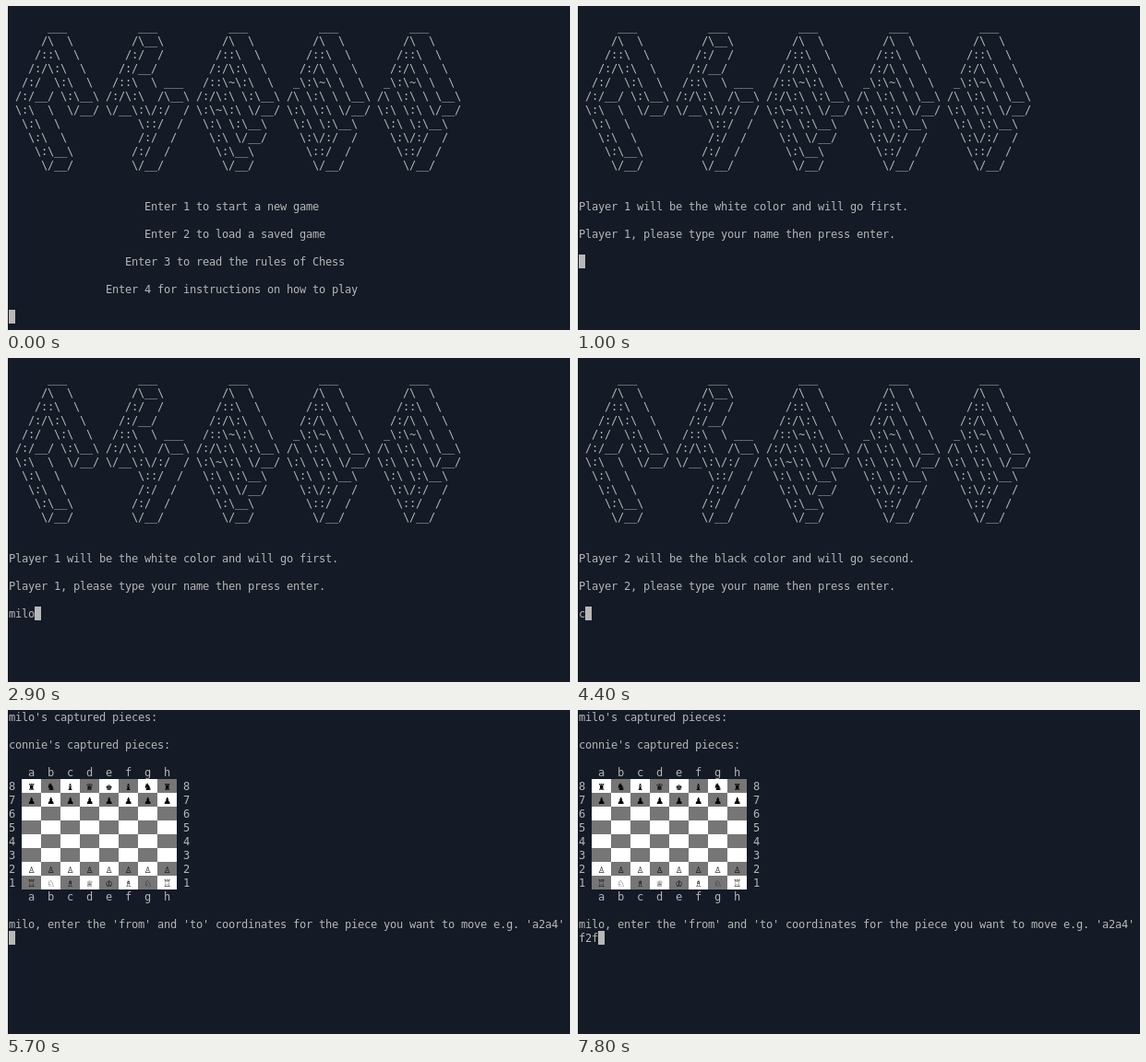
Recreate the animation shown at these times as an HTML page. Size 611x352 px, loop 8 s.

```html
<!DOCTYPE html>
<html lang="en">
<head>
<meta charset="utf-8">
<title>Terminal chess</title>
<style>
  html, body { margin: 0; width: 100%; height: 100%; overflow: hidden; }
  body {
    position: relative;
    background: #141a26;
    color: #b6b6b6;
    font: 12px/15px "DejaVu Sans Mono", monospace;
    letter-spacing: calc(7px - 1ch); /* 7px terminal cells */
  }
  .edge { position: absolute; left: 0; top: 0; width: 2px; height: 100%; background: #eee; }
  section { position: absolute; inset: 0; visibility: hidden; animation: 8s step-end infinite; }
  pre, p { position: absolute; left: 3px; top: calc(var(--row) * 15px); margin: 0; font: inherit; white-space: pre; }
  pre { padding-top: 1px; }

  /* typed text; the right border is the block cursor */
  .typed {
    box-sizing: content-box;
    width: 0;
    height: 14px;
    padding-top: 1px;
    overflow: hidden;
    border-right: 7px solid #b8b8b8;
    animation: 8s step-end infinite;
  }

  .board {
    position: absolute; left: 17px; top: 75px; width: 168px; height: 120px;
    background: conic-gradient(#767676 25%, #fff 0 50%, #767676 0 75%, #fff 0) 0 0 / 42px 30px;
    color: #000;
    display: grid;
    grid-template: repeat(8, 15px) / repeat(8, 21px);
  }
  .board span { padding: 1px 0 0 7px; height: 14px; }

  .title { animation-name: title; }
  .menu { animation-name: menu; }
  .first { animation-name: first; }
  .second { animation-name: second; }
  .game { animation-name: game; }
  .menu .typed { animation-name: type-menu; }
  .first .typed { animation-name: type-first; }
  .second .typed { animation-name: type-second; }
  .game .typed { animation-name: type-move; }

  @keyframes title { 0% { visibility: visible } 71.25%, to { visibility: hidden } }
  @keyframes menu { 0% { visibility: visible } 12.5%, to { visibility: hidden } }
  @keyframes first { 0% { visibility: hidden } 12.5% { visibility: visible } 45%, to { visibility: hidden } }
  @keyframes second { 0% { visibility: hidden } 45% { visibility: visible } 71.25%, to { visibility: hidden } }
  @keyframes game { 0% { visibility: hidden } 71.25%, to { visibility: visible } }

  @keyframes type-menu { 0% { width: 0 } 5%, to { width: 7px } }
  @keyframes type-first {
    0% { width: 0 } 27.5% { width: 7px } 32.5% { width: 21px } 36.25%, to { width: 28px }
  }
  @keyframes type-second {
    0% { width: 0 } 55% { width: 7px } 56.25% { width: 14px } 58.75% { width: 21px }
    60% { width: 28px } 61.25% { width: 35px } 62.5%, to { width: 42px }
  }
  @keyframes type-move {
    0% { width: 0 } 90% { width: 7px } 93.75% { width: 14px } 97.5%, to { width: 21px }
  }
</style>
</head>
<body>
<div class="edge"></div>

<section class="title">
<pre style="--row:1">
      ___           ___           ___           ___           ___
     /\  \         /\__\         /\  \         /\  \         /\  \
    /::\  \       /:/  /        /::\  \       /::\  \       /::\  \
   /:/\:\  \     /:/__/        /:/\:\  \     /:/\ \  \     /:/\ \  \
  /:/  \:\  \   /::\  \ ___   /::\~\:\  \   _\:\~\ \  \   _\:\~\ \  \
 /:/__/ \:\__\ /:/\:\  /\__\ /:/\:\ \:\__\ /\ \:\ \ \__\ /\ \:\ \ \__\
 \:\  \  \/__/ \/__\:\/:/  / \:\~\:\ \/__/ \:\ \:\ \/__/ \:\ \:\ \/__/
  \:\  \            \::/  /   \:\ \:\__\    \:\ \:\__\    \:\ \:\__\
   \:\  \           /:/  /     \:\ \/__/     \:\/:/  /     \:\/:/  /
    \:\__\         /:/  /       \:\__\        \::/  /       \::/  /
     \/__/         \/__/         \/__/         \/__/         \/__/
</pre>
</section>

<section class="menu">
<pre style="--row:14">
                     Enter 1 to start a new game

                     Enter 2 to load a saved game

                  Enter 3 to read the rules of Chess

               Enter 4 for instructions on how to play
</pre>
<p class="typed" style="--row:22">1</p>
</section>

<section class="first">
<pre style="--row:14">
Player 1 will be the white color and will go first.

Player 1, please type your name then press enter.
</pre>
<p class="typed" style="--row:18">milo</p>
</section>

<section class="second">
<pre style="--row:14">
Player 2 will be the black color and will go second.

Player 2, please type your name then press enter.
</pre>
<p class="typed" style="--row:18">connie</p>
</section>

<section class="game">
<div class="board"></div>
<pre style="--row:0">
milo's captured pieces:

connie's captured pieces:

   a  b  c  d  e  f  g  h
8                          8
7                          7
6                          6
5                          5
4                          4
3                          3
2                          2
1                          1
   a  b  c  d  e  f  g  h

milo, enter the 'from' and 'to' coordinates for the piece you want to move e.g. 'a2a4'
</pre>
<p class="typed" style="--row:16">f2f</p>
</section>

<script>
  const ranks = ['♜♞♝♛♚♝♞♜', '♟'.repeat(8), ' '.repeat(32), '♙'.repeat(8), '♖♘♗♕♔♗♘♖'];
  const board = document.querySelector('.board');
  for (const piece of ranks.join('')) {
    const square = document.createElement('span');
    square.textContent = piece;
    board.append(square);
  }
</script>
</body>
</html>
```
